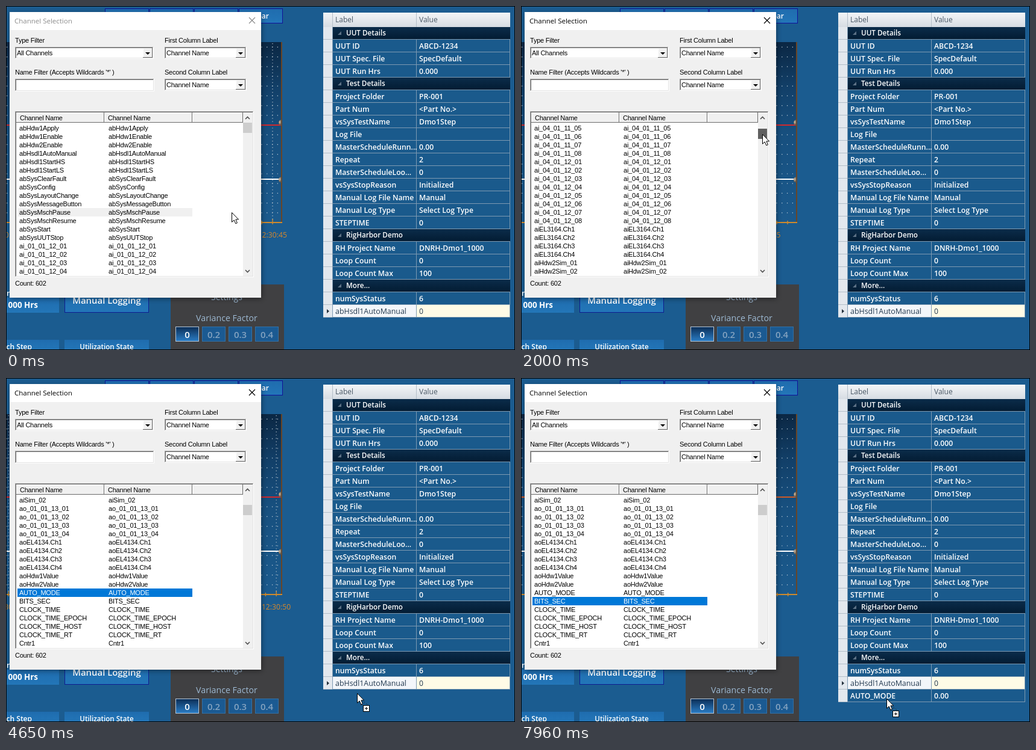
Write an HTML page that moves like this. It is 844 px wide and 572 px high and loops after 8000 ms.

```html
<!DOCTYPE html>
<html lang="en">
<head>
<meta charset="utf-8">
<title>Channel Selection</title>
<style>
html, body { margin: 0; width: 100%; height: 100%; overflow: hidden; background: #1b5c90; }
svg { display: block; width: 844px; height: 572px; }
text { white-space: pre; font-family: "Open Sans", "Noto Sans", sans-serif; }
text.s { font-family: "Liberation Sans", Arial, sans-serif; font-size: 11px; letter-spacing: -.22px; }
rect { shape-rendering: crispEdges; }
</style>
</head>
<body>
<svg id="stage" viewBox="0 0 844 572" xmlns="http://www.w3.org/2000/svg">
<defs>
  <linearGradient id="plot" x2="0" y2="1">
    <stop offset="0" stop-color="#0b2743"/><stop offset=".25" stop-color="#123f68"/>
    <stop offset=".5" stop-color="#174f7e"/><stop offset="1" stop-color="#1b5a8d"/>
  </linearGradient>
  <linearGradient id="head" x2="0" y2="1">
    <stop offset="0" stop-color="#f3f5f7"/><stop offset="1" stop-color="#d6dce3"/>
  </linearGradient>
  <linearGradient id="group" x2="0" y2="1">
    <stop offset="0" stop-color="#0b2c4a"/><stop offset="1" stop-color="#031c33"/>
  </linearGradient>
  <linearGradient id="button" x2="0" y2="1">
    <stop offset="0" stop-color="#1f6cae"/><stop offset="1" stop-color="#2376b8"/>
  </linearGradient>
  <linearGradient id="lit" x2="0" y2="1">
    <stop offset="0" stop-color="#0c2f58"/><stop offset="1" stop-color="#2a7cc4"/>
  </linearGradient>
  <radialGradient id="ball" cx=".4" cy=".4">
    <stop offset="0" stop-color="#d8c9b4"/><stop offset=".5" stop-color="#a08a72"/><stop offset="1" stop-color="#5c5348"/>
  </radialGradient>
  <filter id="soft" x="-10%" y="-10%" width="120%" height="120%"><feGaussianBlur stdDeviation="4"/></filter>
  <clipPath id="plotClip"><rect x="1" y="60" width="457" height="303"/></clipPath>
  <clipPath id="listClip"><rect x="17" y="195" width="375" height="253"/></clipPath>
</defs>
</svg>
<script>
const svg = document.getElementById('stage');
const LOOP = 8000, PX_PER_S = 17.76, STEP = PX_PER_S * 5;
let layer = svg;

function el(tag, attrs) {
  const e = document.createElementNS('http://www.w3.org/2000/svg', tag);
  for (const k in attrs) e.setAttribute(k, attrs[k]);
  layer.appendChild(e);
  return e;
}
const set = (e, attrs) => { for (const k in attrs) e.setAttribute(k, attrs[k]); };
const rect = (x, y, width, height, fill, more) => el('rect', { x, y, width, height, fill, ...more });
const path = (d, fill, more) => el('path', { d, fill, ...more });
function text(x, y, str, size, fill, more) {
  const e = el('text', { x, y, 'font-size': size, fill, ...more });
  e.textContent = str;
  return e;
}
const small = (x, y, str) => text(x, y, str, 11, '#000', { class: 's' });
const mid = { 'text-anchor': 'middle' };
const semi = { 'font-weight': 600 };
function framed(x, y, w, h, fill, edge) {
  rect(x, y, w, h, edge);
  return rect(x + 1, y + 1, w - 2, h - 2, fill);
}
function group() {
  const g = el('g', {});
  return g;
}

// Backdrop and trend plot
rect(0, 0, 844, 572, '#1b5c90');
for (let i = 0; i < 4; i++) framed(164 + i * 74, 4, 73, 25, 'url(#button)', '#10109a');
text(421, 21, 'Clear', 12, '#fff', { ...mid, ...semi });
rect(1, 60, 457, 300, 'url(#plot)');
for (let y = 360 - 16.2; y > 62; y -= 16.2)
  path(`M1 ${y.toFixed(1)}H456`, 'none', { stroke: '#c4d0da', 'stroke-width': 1.2, 'stroke-dasharray': '1.2 7.6' });
const marks = el('g', { 'clip-path': 'url(#plotClip)' });
layer = marks;
const ticks = path('', 'none', { stroke: '#d08a2c', 'stroke-width': 1.4 });
const majors = path('', 'none', { stroke: '#b9c4cc', 'stroke-width': 1.2, 'stroke-dasharray': '1.2 4.2' });
layer = svg;
rect(456, 60, 2, 300, '#6a4526');
rect(1, 359, 457, 2, '#d08a2c');
const redLine = rect(1, 197, 456, 2, '#d3282c');
rect(1, 287, 456, 2, '#fff');
for (const y of [194, 289]) path(`M457 ${y - 5}A5 5 0 1 0 457 ${y + 5}Z`, 'url(#ball)');
const stamps = [];
for (let i = 0; i < 7; i++) stamps.push(text(0, 385, '', 12.2, '#d8882a', { 'text-anchor': 'end' }));

// Lower controls
text(1, 482, 'r', 12, '#fff', semi);
rect(1, 485, 87, 25, 'url(#button)');
text(53, 502, '000 Hrs', 13.4, '#fff', { 'text-anchor': 'end', 'font-weight': 700 });
framed(97, 470, 140, 40, 'url(#button)', '#0d1c90');
text(167, 495, 'Manual Logging', 14.9, '#fff', { ...mid, ...semi });
rect(1, 555, 87, 17, 'url(#button)');
rect(97, 555, 140, 17, 'url(#button)');
text(43, 571, 'Each Step', 12, '#fff', { 'text-anchor': 'end', ...semi });
text(167, 571, 'Utilization State', 11.6, '#fff', { ...mid, ...semi });
rect(273, 463, 188, 109, '#404042');
text(366, 489, 'Settings', 14, '#9db9d3', mid);
text(366, 524, 'Variance Factor', 14.2, '#9db9d3', mid);
['0', '0.2', '0.3', '0.4'].forEach((s, i) => {
  framed(281 + i * 44, 533, 39, 25, i ? '#1b5a92' : 'url(#lit)', i ? '#3272a8' : '#b5c8da');
  text(300.5 + i * 44, 552, s, 15, i ? '#84a3c0' : '#fff', { ...mid, ...semi });
});

// Property table
const props = [
  ['UUT Details'], ['UUT ID', 'ABCD-1234'], ['UUT Spec. File', 'SpecDefault'], ['UUT Run Hrs', '0.000'],
  ['Test Details'], ['Project Folder', 'PR-001'], ['Part Num', '<Part No.>'], ['vsSysTestName', 'Dmo1Step'],
  ['Log File', ''], ['MasterScheduleRunn...', '0.00'], ['Repeat', '2'], ['MasterScheduleLoo...', '0'],
  ['vsSysStopReason', 'Initialized'], ['Manual Log File Name', 'Manual'], ['Manual Log Type', 'Select Log Type'],
  ['STEPTIME', '0'], ['RigHarbor Demo'], ['RH Project Name', 'DNRH-Dmo1_1000'], ['Loop Count', '0'],
  ['Loop Count Max', '100'], ['More...'], ['numSysStatus', '6'], ['abHsdl1AutoManual', '0'], ['AUTO_MODE', '0.00']
];
const LINE = '#7e9ab2';
rect(526, 11, 310, 24, 'url(#head)');
rect(541, 11, 1, 24, '#b4bec8');
rect(680, 11, 1, 24, '#b4bec8');
text(546, 27, 'Label', 12, '#4a5866');
text(685, 27, 'Value', 12, '#4a5866');
let newRow;
props.forEach(([label, value], i) => {
  const y = 35 + 21 * i, chosen = i === 22;
  const g = group();
  layer = g;
  rect(526, y, 15, 21, '#e3e8ee');
  rect(526, y + 20, 15, 1, '#b3bfca');
  rect(541, y, 295, 21, LINE);
  if (value === undefined) {
    rect(542, y, 294, 20, 'url(#group)');
    path(`M556 ${y + 7}V${y + 13}H550Z`, '#5d7286');
    text(564, y + 14, label, 11.7, '#fff', semi);
  } else {
    rect(542, y, 138, 20, chosen ? '#f3f6fa' : '#1a5a8c');
    rect(681, y, 154, 20, chosen ? '#fffbe6' : '#1a5a8c');
    const ink = chosen ? '#23394f' : '#fff';
    text(546, y + 15, label, chosen ? 12.4 : 12.2, ink, chosen ? {} : semi);
    text(685, y + 15, value, 12.2, ink, chosen ? {} : semi);
    if (chosen) path(`M532 ${y + 7}l4 3.5-4 3.5z`, '#26323e');
  }
  layer = svg;
  newRow = g;
});

// Dialog
rect(8, 13, 416, 474, '#000', { opacity: .4, filter: 'url(#soft)' });
rect(6, 10, 417, 475, '#f0f0f0');
rect(6, 10, 417, 30, '#fff');
const title = text(14, 29, 'Channel Selection', 11.5, '#000');
const cross = path('M403 19l10 10M413 19l-10 10', 'none', { 'stroke-width': 1.2 });

function sunken(x, y, w, h) {
  rect(x, y, w, h, '#fff');
  rect(x, y, w - 1, h - 1, '#a0a0a0');
  rect(x + 1, y + 1, w - 2, h - 2, '#e3e3e3');
  rect(x + 1, y + 1, w - 3, h - 3, '#696969');
  rect(x + 2, y + 2, w - 4, h - 4, '#fff');
}
function combo(x, y, w, h, str) {
  sunken(x, y, w, h);
  const bx = x + w - 18;
  rect(bx, y + 2, 16, h - 4, '#696969');
  rect(bx, y + 2, 15, h - 5, '#fff');
  rect(bx + 1, y + 3, 14, h - 6, '#f0f0f0');
  path(`M${bx + 4} ${y + h / 2 - 1}h8l-4 4z`, '#000');
  small(x + 3, y + h / 2 + 4, str);
}
small(15, 61, 'Type Filter');
small(263, 61, 'First Column Label');
small(15, 114, "Name Filter (Accepts Wildcards '*' )");
small(263, 114, 'Second Column Label');
combo(15, 68, 230, 20, 'All Channels');
combo(263, 68, 136, 20, 'Channel Name');
combo(263, 121, 136, 20, 'Channel Name');
sunken(15, 121, 231, 21);
small(15, 465, 'Count: 602');

sunken(15, 175, 396, 276);
for (const [x, w, str] of [[17, 146, 'Channel Name'], [163, 146, 'Channel Name'], [309, 84, '']]) {
  rect(x, 177, w, 17, '#696969');
  rect(x, 177, w - 1, 16, '#fff');
  rect(x + 1, 178, w - 2, 15, '#f0f0f0');
  small(x + 6, 190, str);
}
rect(393, 177, 16, 272, '#f0f0f0');
const arrow = { stroke: '#505050', 'stroke-width': 1.6 };
path('M397 188l3.5-3.5 3.5 3.5', 'none', arrow);
path('M397 439l3.5 3.5 3.5-3.5', 'none', arrow);
const thumb = rect(393, 194, 15, 17, '#cdcdcd');

const run = (prefix, n) => Array.from({ length: n }, (_, i) => prefix + (i + 1));
const words = s => s.split(' ');
const items = [
  ...words('abHdw1Apply abHdw1Enable abHdw2Enable abHsdl1AutoManual abHsdl1StartHS abHsdl1StartLS ' +
    'abSysClearFault abSysConfig abSysLayoutChange abSysMessageButton abSysMschPause abSysMschResume ' +
    'abSysStart abSysUUTStop'),
  ...run('ai_01_01_12_0', 8), ...run('ai_04_01_11_0', 8), ...run('ai_04_01_12_0', 8),
  ...run('aiEL3164.Ch', 4), ...run('aiHdw2Sim_0', 2), ...run('aiSim_0', 2),
  ...run('ao_01_01_13_0', 4), ...run('aoEL4134.Ch', 4),
  ...words('aoHdw1Value aoHdw2Value AUTO_MODE BITS_SEC CLOCK_TIME CLOCK_TIME_EPOCH CLOCK_TIME_HOST ' +
    'CLOCK_TIME_RT Cntr1')
];
const list = el('g', { 'clip-path': 'url(#listClip)' });
layer = list;
const mark = rect(19, 0, 290, 14, '#0078d7');
const rows = [];
for (let i = 0; i < 18; i++) rows.push([22, 170].map(x => small(x, 207 + 14 * i, '')));
layer = svg;

// Pointer
const pointer = group();
layer = pointer;
path('M.5.5V16.3L4.2 12.9 6.8 18.8 9.4 17.7 6.9 11.9H11.6Z', '#fff', { stroke: '#000', 'stroke-width': 1 });
const plus = group();
layer = plus;
path('M6 19.5h4M12 14v4M15 17l5 5M13 22h-3', 'none', { stroke: '#222', 'stroke-width': 1, 'stroke-dasharray': '1 1' });
framed(10, 20, 11, 11, '#fff', '#000');
path('M13 25.5h5M15.5 23v5', 'none', { stroke: '#000', 'stroke-width': 1 });
layer = svg;

rect(.5, .5, 843, 571, 'none', { stroke: '#000' });

// Pointer stops: time, x, y
const stops = [
  [0, 374, 343], [400, 374, 343], [1130, 403, 202.6], [1270, 403, 202.6], [1370, 403, 204.5],
  [2000, 400, 213], [2200, 399, 219.6], [2340, 399, 219.6], [3000, 254, 345], [3170, 254, 345],
  [3800, 247, 352], [4000, 247, 352], [4650, 582, 524], [5620, 582, 524], [5860, 558, 525],
  [6340, 232, 390], [6440, 232, 390], [7150, 240, 366], [7310, 240, 366], [7950, 606, 533], [LOOP, 606, 533]
];
function pointerAt(t) {
  const i = stops.findIndex(s => s[0] > t);
  const [t0, x0, y0] = stops[i - 1], [t1, x1, y1] = stops[i];
  const p = (t - t0) / (t1 - t0), k = p * p * (3 - 2 * p);
  return [x0 + (x1 - x0) * k, y0 + (y1 - y0) * k];
}

function drawAxis(t) {
  const edge = 466 - PX_PER_S * t / 1000;
  let minor = '', major = '';
  stamps.forEach((s, i) => {
    const x = edge + (i - 5) * STEP, c = x - 24;
    set(s, { x: x.toFixed(2), visibility: c > 458 ? 'hidden' : 'visible' });
    s.textContent = '12:30:' + (20 + 5 * i);
    major += `M${c.toFixed(1)} 62V358`;
    for (let j = 0; j < 5; j++) minor += `M${(c + j * PX_PER_S).toFixed(1)} ${j ? 357 : 354}V363`;
  });
  set(ticks, { d: minor });
  set(majors, { d: major });
}

function drawList(t, y) {
  const active = t >= 1270, held = active && t < 2340;
  const moved = held ? Math.max(0, Math.round(y - 202.6)) : active ? 17 : 0;
  const first = Math.round(moved * 2.63);
  const chosen = t < 3880 ? 10 : t < 7200 ? 56 : 57;
  rows.forEach((pair, i) => pair.forEach(e => {
    e.textContent = items[first + i];
    set(e, { fill: active && first + i === chosen ? '#fff' : '#000' });
  }));
  set(mark, { y: 196 + 14 * (chosen - first), fill: active ? '#0078d7' : '#f0f0f0' });
  set(thumb, { y: 194 + moved, fill: held ? '#606060' : '#cdcdcd' });
  set(title, { fill: active ? '#000' : '#8c8c8c' });
  set(cross, { stroke: active ? '#000' : '#8c8c8c' });
}

function draw(t) {
  const [x, y] = pointerAt(t);
  const dragging = t >= 4000 && t < 4860 || t >= 7310;
  drawAxis(t);
  drawList(t, y);
  set(redLine, { fill: t < 5100 ? '#d3282c' : '#cf5a26' });
  set(newRow, { visibility: t >= 4860 ? 'visible' : 'hidden' });
  set(plus, { visibility: dragging && x > 526 ? 'visible' : 'hidden' });
  set(pointer, { transform: `translate(${Math.round(x)} ${Math.round(y)})` });
}

function tick(now) {
  draw(now % LOOP);
  requestAnimationFrame(tick);
}
draw(0);
requestAnimationFrame(tick);
</script>
</body>
</html>
```
